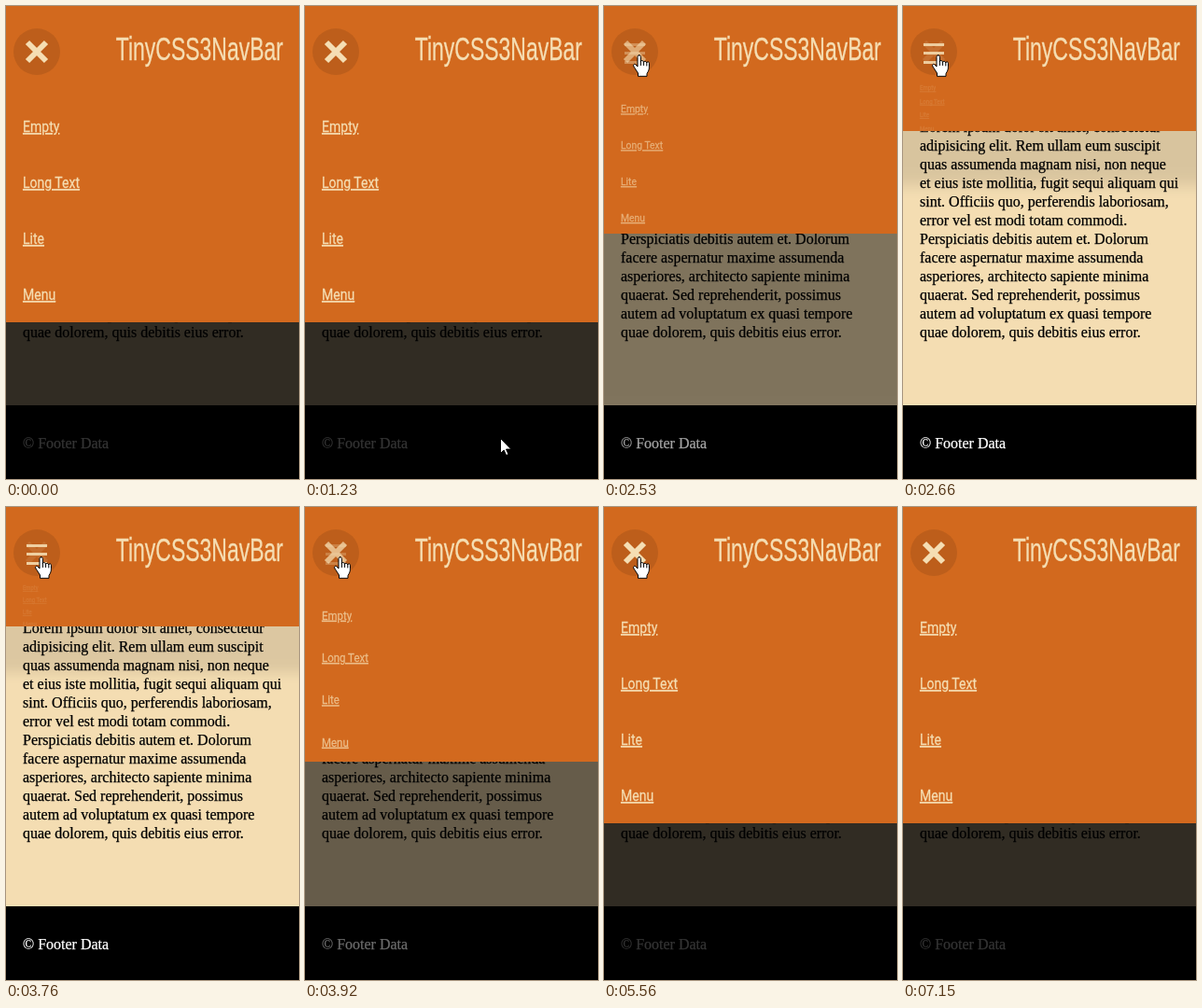
An HTML page that plays this animation: 314 by 507 pixels, repeating every 8.24 s.

```html
<!DOCTYPE html>
<html lang="en">
<head>
<meta charset="utf-8">
<title>TinyCSS3NavBar</title>
<style>
html, body { margin: 0; width: 100%; height: 100%; overflow: hidden; background: #f4ddb2; }
svg, #panel { position: absolute; left: 0; top: 0; }
#panel { width: 314px; background: #d2691e; }
.body { font: 16px "Liberation Serif", "Times New Roman", serif; stroke-width: .25; }
.title { font: 23px "Liberation Sans", Arial, sans-serif; fill: #f5deb3; stroke: #f5deb3; stroke-width: .25; }
.link { font-family: Roboto, sans-serif; fill: #f5deb3; stroke: #f5deb3; stroke-width: .25; text-decoration: underline; }
.mark { stroke: #f5deb3; fill: none; }
</style>
</head>
<body>
<svg width="314" height="507" viewBox="0 0 314 507">
  <g id="lorem" class="body" stroke="#000"></g>
  <rect y="428" width="314" height="79"/>
  <text class="body" x="18" y="474" fill="#fff" stroke="#fff">© Footer Data</text>
</svg>
<div id="panel"></div>
<svg width="314" height="507" viewBox="0 0 314 507">
  <text class="title" text-anchor="end" transform="translate(297 58) scale(1 1.5)">TinyCSS3NavBar</text>
  <circle cx="33" cy="49" r="25" fill="#000" fill-opacity=".1"/>
  <path id="cross" class="mark" stroke-width="6" d="M23 39L43 59M43 39L23 59"/>
  <path id="bars" class="mark" stroke-width="3" d="M22 41.5H44M22 50.5H44M22 60.5H44"/>
  <g id="links"></g>
  <g id="hand" stroke="#000" stroke-linejoin="round" stroke-linecap="round">
    <path fill="#fff" d="M6.7.7C5.6.7 5 1.5 5 2.5V13L3 10.8C2 9.8.6 10.3.6 11.8c0 1 .6 1.6 1.2 2.4L5.5 20V23.3H15V20.5c1.5-2.5 2.4-4 2.4-7V9.3c0-1.8-2.4-1.8-2.6-.4C14.5 7 12 7 11.6 8.2 11.4 6.3 8.4 6 8.4 7.4V2.5C8.4 1.4 7.7.7 6.7.7Z"/>
    <path fill="none" d="M8.4 7.4V11.5M11.6 8.2V11.5M14.8 8.9V12"/>
  </g>
  <path id="arrow" fill="#fff" stroke="#000" d="M6.5.5V16.5L10.2 13L12.6 18.6L15 17.6L12.6 12.1H17.8Z"/>
</svg>
<script>
const LOOP = 8240, START = 1230, TICK = 78.7;
const CLOSED = 99, OPEN = 339;
const $ = id => document.getElementById(id);

const lines = [
  "Lorem ipsum dolor sit amet, consectetur",
  "adipisicing elit. Rem ullam eum suscipit",
  "quas assumenda magnam nisi, non neque",
  "et eius iste mollitia, fugit sequi aliquam qui",
  "sint. Officiis quo, perferendis laboriosam,",
  "error vel est modi totam commodi.",
  "Perspiciatis debitis autem et. Dolorum",
  "facere aspernatur maxime assumenda",
  "asperiores, architecto sapiente minima",
  "quaerat. Sed reprehenderit, possimus",
  "autem ad voluptatum ex quasi tempore",
  "quae dolorem, quis debitis eius error."
];

// Pointer key points: tick, left, top
const route = [
  [0, 203, 463], [4, 105, 188], [7, 28, 50], [10, 27, 50], [14, 31, 52],
  [32, 31, 53], [55, 31, 53], [59, 32, 59], [65, 31, 54], [70, 98, 190], [74, 273, 488]
];

function addText(parent, text, attrs) {
  const el = document.createElementNS("http://www.w3.org/2000/svg", "text");
  for (const key in attrs) el.setAttribute(key, attrs[key]);
  el.textContent = text;
  return parent.appendChild(el);
}

lines.forEach((line, i) => addText($("lorem"), line, { x: 18, y: 135 + 20 * i }));
const links = ["Empty", "Long Text", "Lite", "Menu"].map(
  name => addText($("links"), name, { class: "link" }));

// CSS "ease": cubic-bezier(.25, .1, .25, 1)
function ease(x) {
  if (x <= 0) return 0;
  if (x >= 1) return 1;
  const curve = (s, a, b) => 3 * s * (1 - s) ** 2 * a + 3 * s * s * (1 - s) * b + s ** 3;
  let lo = 0, hi = 1;
  for (let i = 0; i < 24; i++) {
    const mid = (lo + hi) / 2;
    if (curve(mid, .25, .25) < x) lo = mid; else hi = mid;
  }
  return curve(lo, .1, 1);
}

function openness(tick) {
  if (tick < 20) return 1 - ease(((tick - 18) * TICK + 280) / 500);
  if (tick < 32) return 0;
  return ease(((tick - 32) * TICK + 58) / 500);
}

function pointerAt(tick) {
  const next = route.findIndex(key => key[0] > tick);
  if (next < 1) return tick === route.at(-1)[0] ? route.at(-1).slice(1) : null;
  const [a, b] = [route[next - 1], route[next]];
  const u = (tick - a[0]) / (b[0] - a[0]);
  return [1, 2].map(i => Math.round(a[i] + (b[i] - a[i]) * u));
}

function drawPanel(p) {
  const height = Math.round(CLOSED + (OPEN - CLOSED) * p);
  const gap = OPEN - height;
  const size = 1 - .00275 * gap;
  $("panel").style.height = height + "px";
  $("panel").style.boxShadow = `0 0 ${100 * p}px ${410 * p}px rgba(0,0,0,${.8 * p})`;
  $("cross").setAttribute("opacity", p);
  $("bars").setAttribute("opacity", 1 - p);
  $("links").setAttribute("opacity", p);
  links.forEach((link, i) => {
    const y = 129.5 - .2025 * gap + i * (60 - .2225 * gap) + 5.5 * size;
    link.setAttribute("font-size", 16 * size);
    link.setAttribute("transform", `translate(18 ${y}) scale(.877 1)`);
  });
}

function drawPointer(spot) {
  const [x, y] = spot || [0, 0];
  const over = Math.hypot(x + 6 - 33, y - 49) < 25;
  for (const [id, shown] of [["hand", over], ["arrow", !over]]) {
    $(id).setAttribute("transform", `translate(${x} ${y})`);
    $(id).setAttribute("display", spot && shown ? "inline" : "none");
  }
}

function draw(ms) {
  const tick = Math.floor((ms % LOOP - START) / TICK);
  drawPanel(openness(tick));
  drawPointer(pointerAt(tick));
}

const began = performance.now();
function loop() {
  draw(performance.now() - began);
  requestAnimationFrame(loop);
}
loop();
</script>
</body>
</html>
```
